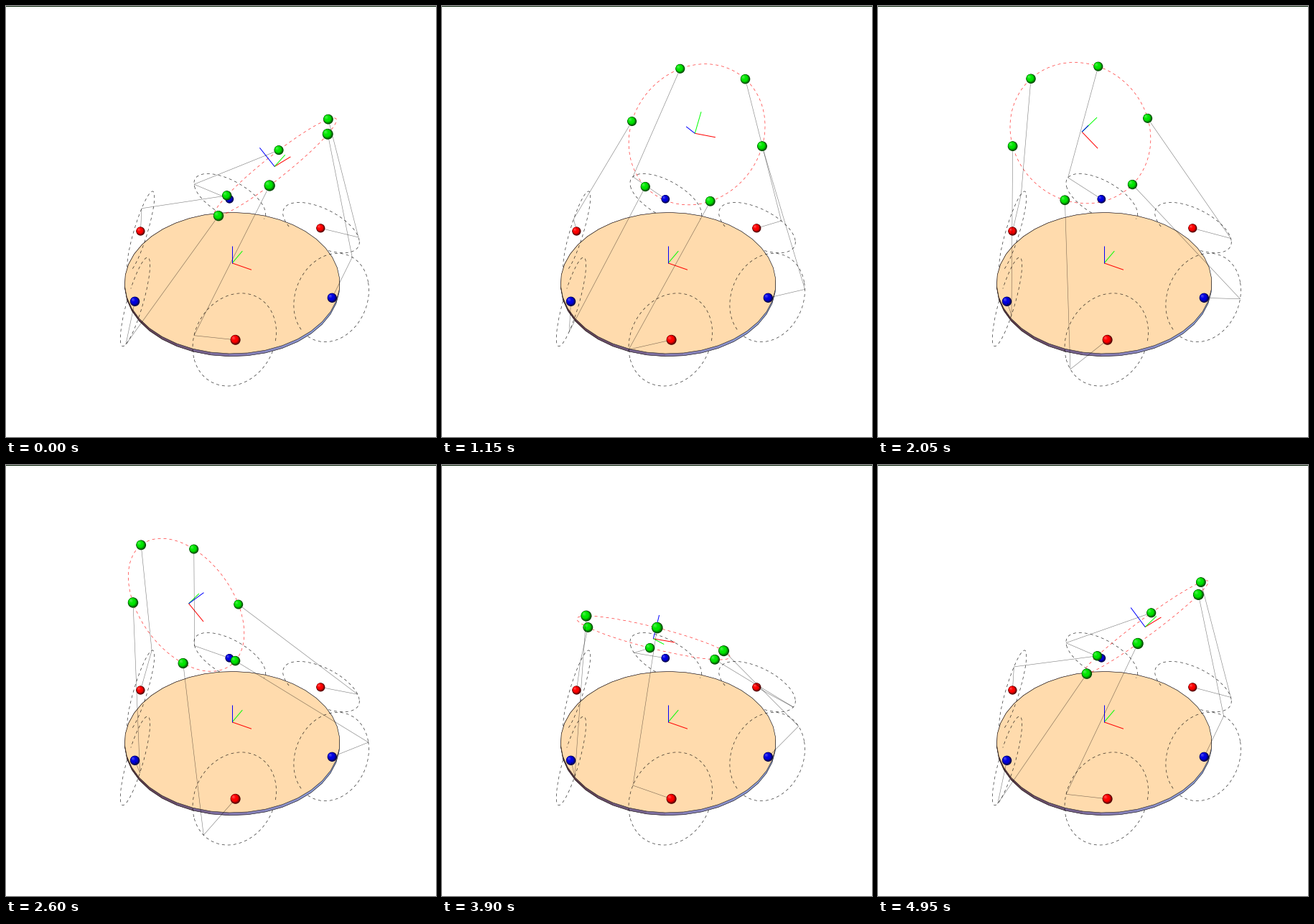
A matplotlib script for the animation above (5000 ms loop, 599x600 px).

```python
import numpy as np
import matplotlib.pyplot as plt
from matplotlib.animation import FuncAnimation
from matplotlib.collections import PolyCollection

W, H, DPI = 599, 600, 100
FRAMES, INTERVAL = 100, 50
PX = 72 / DPI  # points per pixel

# Perspective camera
VIEW = np.array([1.3, -2.4, 2.0])
VIEW /= np.linalg.norm(VIEW)
RIGHT = np.cross([0, 0, 1], VIEW)
RIGHT /= np.linalg.norm(RIGHT)
UP = np.cross(VIEW, RIGHT)
LOOK = np.array([0, 0, 3.45])
DIST, FOCAL = 42.32, 1344
CENTRE = (315.1, 273.6)
EYE = LOOK + DIST * VIEW

# Mechanism dimensions
BASE_R, DISC_R, DISC_TOP, DISC_BOTTOM = 5, 4.98, -0.825, -0.985
PLATE_R, PLATE_Z, ORBIT = 3.2, 6, 2
HORN, ROD, BALL = 2, 7.15, 0.21
TILT, SWAY = np.radians(22), np.radians(45)
ANGLES = np.radians(np.arange(0, 360, 60))
EZ = np.array([0, 0, 1.0])


def heading(a):
    a = np.asarray(a, float)
    return np.stack([np.cos(a), np.sin(a), 0 * a], axis=-1)


def project(p):
    """Return screen x, screen y and depth of points."""
    q = np.asarray(p, float) - LOOK
    depth = DIST - q @ VIEW
    x = CENTRE[0] + FOCAL * (q @ RIGHT) / depth
    y = CENTRE[1] - FOCAL * (q @ UP) / depth
    return x, y, depth


def screen(p):
    x, y, _ = project(p)
    return np.column_stack([x, y])


def behind_disc(p):
    hidden = np.zeros(len(p), bool)
    for level in (DISC_TOP, DISC_BOTTOM):
        k = (level - p[:, 2]) / (EYE[2] - p[:, 2])
        hit = p + k[:, None] * (EYE - p)
        hidden |= (k > 0) & (np.hypot(hit[:, 0], hit[:, 1]) < DISC_R)
    return hidden


def behind_balls(p, balls):
    x, y, depth = project(p)
    bx, by, bd = project(balls)
    gap = np.hypot(x[:, None] - bx, y[:, None] - by) / (FOCAL * BALL / bd)
    front = bd - BALL * np.sqrt(np.clip(1 - gap ** 2, 0, 1))
    return ((gap < 1) & (depth[:, None] > front)).any(axis=1)


def segment(a, b, n=150):
    return a + np.linspace(0, 1, n)[:, None] * (b - a)


def ring(centre, ex, ey, radius, n=240):
    a = np.linspace(0, 2 * np.pi, n)[:, None]
    return centre + radius * (np.cos(a) * ex + np.sin(a) * ey)


def put(line, p, balls=None):
    """Show the visible part of a 3D path."""
    xy = screen(p)
    hidden = behind_disc(p)
    if balls is not None:
        hidden |= behind_balls(p, balls)
    xy[hidden] = np.nan
    line.set_data(xy[:, 0], xy[:, 1])


# Motors stand in pairs that share one tilted plane
MOTORS = BASE_R * heading(ANGLES)
SIDE = np.where(np.arange(6) % 2 == 0, 1, -1)
PAIR = heading(ANGLES - SIDE * np.radians(30))
OUT = SIDE[:, None] * np.cross(EZ, PAIR)
RISE = np.cos(TILT) * EZ - np.sin(TILT) * PAIR


def pose(t):
    a, b = SWAY * np.sin(t), -SWAY * np.cos(t)
    ca, sa, cb, sb = np.cos(a), np.sin(a), np.cos(b), np.sin(b)
    axes = np.array([[cb, 0, -sb],
                     [sa * sb, ca, sa * cb],
                     [sb * ca, -sa, cb * ca]])
    return ORBIT * heading(t) + PLATE_Z * EZ, axes


def horn_tips(joints):
    q = joints - MOTORS
    x, y = (q * OUT).sum(1), (q * RISE).sum(1)
    k = ((q ** 2).sum(1) + HORN ** 2 - ROD ** 2) / (2 * HORN)
    phi = np.arctan2(y, x) - np.arccos(np.clip(k / np.hypot(x, y), -1, 1))
    return MOTORS + HORN * (np.cos(phi)[:, None] * OUT
                            + np.sin(phi)[:, None] * RISE)


fig = plt.figure(figsize=(W / DPI, H / DPI), dpi=DPI, facecolor="white")
ax = fig.add_axes([0, 0, 1, 1])
ax.set_xlim(0, W)
ax.set_ylim(H, 0)
ax.axis("off")


def new_line(color, width, z, dash=None, alpha=1):
    line, = ax.plot([], [], color=color, lw=width * PX, zorder=z, alpha=alpha,
                    solid_capstyle="butt", dash_capstyle="butt")
    if dash:
        line.set_linestyle((0, (dash / width, dash / width)))
    return line


def draw_disc():
    rim = DISC_R * heading(np.radians(np.arange(0, 360, 9)))
    top, low = screen(rim + DISC_TOP * EZ), screen(rim + DISC_BOTTOM * EZ)
    walls = np.stack([top, np.roll(top, -1, 0), np.roll(low, -1, 0), low], 1)
    lit = heading(np.radians(np.arange(4.5, 360, 9))) @ RIGHT
    shades = np.column_stack([np.interp(lit, [-1, 0, 1], c) for c in
                              ([80, 132, 145], [40, 120, 172], [48, 175, 235])])
    ax.add_collection(PolyCollection(walls, facecolors=shades / 255,
                                     edgecolors=shades / 255,
                                     linewidths=0.3, zorder=1))
    for pts, fill, z in ((low, "none", 2), (top, "#ffdbad", 3)):
        ax.fill(*pts.T, facecolor=fill, edgecolor="#1c1712",
                lw=0.6 * PX, zorder=z)


draw_disc()
ax.fill([0, W, W, 0], [0, 0, 1, 1], color="#062006", lw=0,
        antialiased=False, zorder=1)

for m, o, r in zip(MOTORS, OUT, RISE):
    put(new_line("black", 0.7, 4, 4, 0.8), ring(m, o, r, HORN))

plate_ring = new_line("red", 0.7, 4, 4, 0.8)
TRIAD = ("red", "lime", "blue")
base_axes = [new_line(c, 1, 6) for c in TRIAD]
plate_axes = [new_line(c, 1, 6) for c in TRIAD]
horns = [new_line("black", 0.6, 7, alpha=0.5) for _ in ANGLES]
rods = [new_line("black", 0.6, 7, alpha=0.5) for _ in ANGLES]

# Balls: stacked discs lit from the upper left, dark at the lower right
LAYERS = 10
TINTS = np.array([[1, 0, 0], [0, 0, 0.88], [0, 0.9, 0]])
BALL_TINT = np.concatenate([TINTS[[1, 0] * 3], TINTS[[2] * 6]])
glow = np.linspace(0, 1, LAYERS)
balls_art = ax.scatter(np.zeros(12 * LAYERS), np.zeros(12 * LAYERS),
                       linewidths=0, zorder=5)


def draw_balls(balls):
    x, y, depth = project(balls)
    order = np.argsort(-depth)
    x, y = x[order, None], y[order, None]
    r = FOCAL * BALL / depth[order, None]
    shift = 0.42 * r * glow
    size = 2 * r * (1 - 0.8 * glow) * PX
    tint = BALL_TINT[order][:, None, :]
    body = tint * (0.3 + 0.7 * np.minimum(1, 2.5 * glow))[None, :, None]
    shine = 0.25 * np.clip(3 * glow - 2, 0, 1)[None, :, None]
    balls_art.set_offsets(np.column_stack([(x - shift).ravel(),
                                           (y - shift).ravel()]))
    balls_art.set_sizes((size ** 2).ravel())
    balls_art.set_facecolors((body + (1 - body) * shine).reshape(-1, 3))


def update(frame):
    centre, axes = pose(2 * np.pi * frame / FRAMES)
    joints = centre + PLATE_R * heading(ANGLES) @ axes
    tips = horn_tips(joints)
    balls = np.concatenate([MOTORS, joints])
    put(plate_ring, ring(centre, axes[0], axes[1], PLATE_R))
    for i in range(3):
        put(base_axes[i], segment(0 * EZ, np.eye(3)[i]), balls)
        put(plate_axes[i], segment(centre, centre + axes[i]), balls)
    for i in range(6):
        put(horns[i], segment(MOTORS[i], tips[i]), balls)
        put(rods[i], segment(tips[i], joints[i], 300), balls)
    draw_balls(balls)
    return []


anim = FuncAnimation(fig, update, frames=FRAMES, interval=INTERVAL,
                     repeat=True, repeat_delay=0, blit=False)
plt.show()
```
